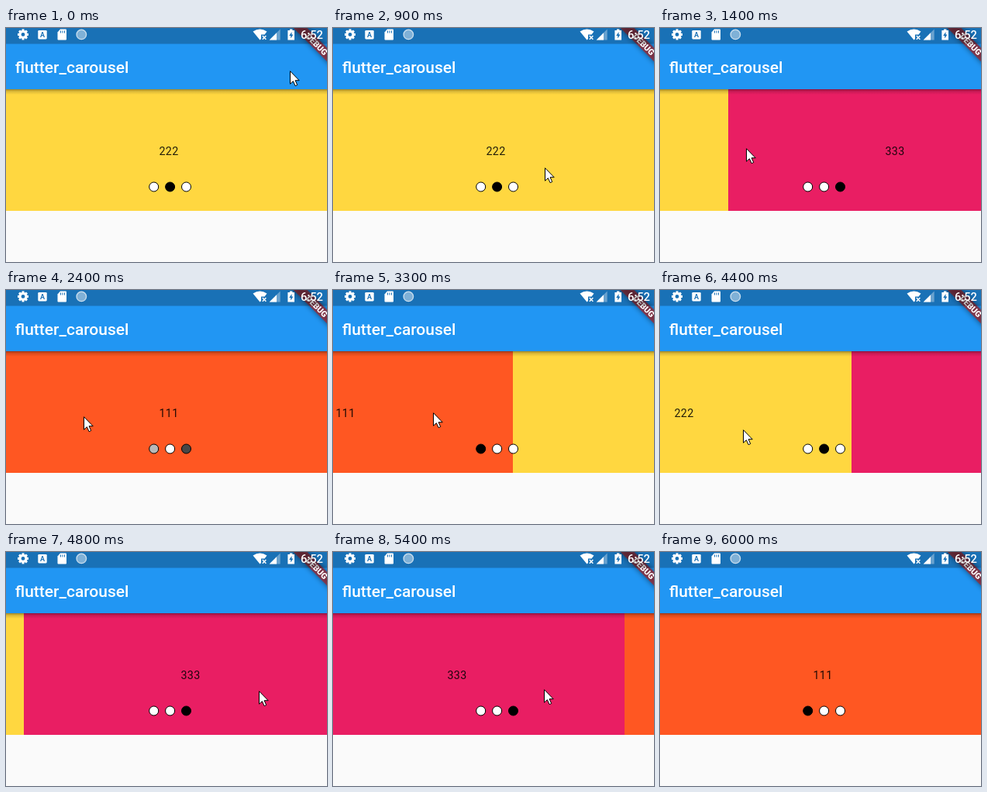
Recreate the animation shown at these times as an HTML page. Size 414 by 302 pixels, loop 6.5 s.

```html
<!DOCTYPE html>
<html lang="en">
<head>
<meta charset="utf-8">
<title>Carousel demo</title>
<style>
html, body { margin: 0; width: 100%; height: 100%; overflow: hidden; background: #fafafa; }
svg { display: block; width: 414px; height: 302px; font-family: Roboto, sans-serif; }
</style>
</head>
<body>
<svg viewBox="0 0 414 302" xmlns="http://www.w3.org/2000/svg">
  <defs>
    <linearGradient id="shade" x1="0" y1="0" x2="0" y2="1">
      <stop offset="0" stop-color="#000" stop-opacity=".38"/>
      <stop offset=".4" stop-color="#000" stop-opacity=".14"/>
      <stop offset="1" stop-color="#000" stop-opacity="0"/>
    </linearGradient>
    <filter id="soft" x="-20%" y="-150%" width="140%" height="400%">
      <feGaussianBlur stdDeviation="3.5"/>
    </filter>
    <clipPath id="view"><rect y="79" width="414" height="157"/></clipPath>
  </defs>
  <rect width="414" height="302" fill="#fafafa"/>

  <g id="pages" clip-path="url(#view)" font-size="14.3" letter-spacing=".25" text-anchor="middle" fill-opacity=".87"></g>
  <g id="dots" stroke="#000"></g>

  <rect y="79" width="414" height="7" fill="url(#shade)"/>
  <rect width="414" height="79" fill="#2196f3"/>
  <text x="11.7" y="57.6" font-size="21" font-weight="500" fill="#fff">flutter_carousel</text>

  <g transform="translate(400.8 21.2) rotate(45)">
    <rect x="-42" y="-6.3" width="84" height="12.6" fill-opacity=".5" filter="url(#soft)"/>
    <rect x="-42" y="-6.3" width="84" height="12.6" fill="#b71c1c" fill-opacity=".63"/>
    <text y="3.8" font-size="10.7" font-weight="900" text-anchor="middle" fill="#fff">DEBUG</text>
  </g>
  <rect width="414" height="20.5" fill-opacity=".25"/>

  <g fill="#fff">
    <g transform="translate(22 8.4)">
      <circle r="4" fill="none" stroke="#fff" stroke-width="3.2"/>
      <g id="teeth"></g>
    </g>
    <rect x="41.3" y="3" width="11.4" height="11.4" rx="1.3"/>
    <text x="47" y="12" font-size="9" font-weight="700" text-anchor="middle" fill="#1970b6">A</text>
    <path d="M70 1.6h7q1 0 1 1v12q0 1-1 1h-9.500q-1 0-1-1v-9z"/>
    <path d="M70.500 3.500v3M73 3.500v3M75.500 3.500v3" stroke="#1970b6"/>
    <circle cx="97.300" cy="8.400" r="6.300" fill-opacity=".45" stroke="#fff" stroke-opacity=".7" stroke-width="1.300"/>

    <path d="M318.500 4.500Q327.500-1.500 336.500 4.500L333.500 8.500H329V14L327.500 15.500Z"/>
    <path d="M330.800 10l4.600 4.800M335.400 10l-4.600 4.800" stroke="#fff" stroke-width="1.500"/>
    <path d="M353.700 1.500V15.500H339.700Z" fill-opacity=".35"/>
    <path d="M349 6.200V15.500H339.700Z"/>
    <path d="M366 1.500h3.400v1.600h2.600v12.400h-8.600V3.100H366z"/>
    <path d="M368.500 5l-3.300 5h2v3.500l3.200-5h-1.900z" fill="#1970b6"/>
    <text x="380" y="14" font-size="14.700" font-weight="500">6:52</text>
  </g>

  <path id="mouse" d="M.5 .7V17.200L4.400 13.700L7.100 19.700L9.700 18.500L7.100 12.700H12.200Z" fill="#fff" stroke="#000"/>
</svg>
<script>
const LOOP = 6500, STEP = 100, HIDE = 6000;
const W = 431, LEFT = -5, SLOP = 20, FADE = 100, BACK = 335;
const slides = [["111", "#ff5722"], ["222", "#ffd740"], ["333", "#e91e63"]];

// each swipe drags from a to b, then the pointer waits and goes back;
// a snapping swipe jumps to the next page on release, others fling
const swipes = [
  { from: 900, to: 1250, a: [273, 180], b: [111, 155], wait: 150, speed: 1500 },
  { from: 2060, to: 2372, a: [346, 163], b: [95, 163], snap: true },
  { from: 2950, to: 3300, a: [343, 168], b: [129, 158], speed: 1700 },
  { from: 4010, to: 4515, a: [306, 180], b: [77, 180], speed: 0 },
  { from: 5250, to: 5672, a: [342, 179], b: [101, 172], snap: true }
];

// pointer rests as [time, [x, y]]
const rests = [[0, [366, 55]], [700, swipes[0].a]];
swipes.forEach((s, i) => {
  const end = s.to + (s.wait || 0);
  const next = swipes[i + 1] ? swipes[i + 1].a : [375, 178];
  rests.push([s.from, s.a], [s.to, s.b], [end, s.b], [end + BACK, next]);
});

const $ = q => document.querySelector(q);
const ease = k => k * k * (3 - 2 * k);
const mix = (a, b, k) => a + (b - a) * k;
const repeat = (n, f) => Array.from({ length: n }, (_, i) => f(i)).join("");

$("#teeth").innerHTML = repeat(8, i =>
  `<rect x="-1.5" y="-7" width="3" height="3" transform="rotate(${i * 45})"/>`);
$("#dots").innerHTML = repeat(3, i => `<circle cx="${190.7 + i * 20.9}" cy="205" r="6"/>`);
$("#pages").innerHTML = repeat(2, () =>
  `<g><rect y="79" width="${W + 1}" height="158" fill-opacity="1"/><text x="215" y="163.5"></text></g>`);
const pages = [...$("#pages").children], dots = [...$("#dots").children];

function pointer(t) {
  const i = rests.findIndex(r => r[0] > t);
  if (i < 0) return rests[rests.length - 1][1];
  const [t0, p] = rests[i - 1], [t1, q] = rests[i];
  const k = ease((t - t0) / (t1 - t0));
  return [mix(p[0], q[0], k), mix(p[1], q[1], k)];
}

// overdamped page spring: distance left after s seconds
function spring(x, v, s) {
  const r = 9.07, q = 22.2, a = (q * x - v) / (q - r);
  return a * Math.exp(-r * s) + (x - a) * Math.exp(-q * s);
}

function scroll(t) {
  const n = swipes.filter(s => s.from <= t).length;
  if (!n) return W;
  const s = swipes[n - 1];
  const moved = Math.max(0, s.a[0] - SLOP - pointer(Math.min(t, s.to))[0]);
  if (t < s.to) return n * W + moved;
  return (n + 1) * W - (s.snap ? 0 : spring(W - moved, s.speed, (t - s.to) / 1000));
}

function draw(t) {
  const pos = Math.round(scroll(t)), first = Math.floor(pos / W);
  pages.forEach((g, i) => {
    const n = first + i, [label, color] = slides[n % 3];
    g.setAttribute("transform", `translate(${n * W - pos + LEFT} 0)`);
    g.firstChild.setAttribute("fill", color);
    g.lastChild.textContent = label;
  });

  const done = swipes.filter(s => s.to <= t).length;
  const k = done ? Math.min(1, (t - swipes[done - 1].to) / FADE) : 1;
  const ink = [0, 0, 0];
  ink[done % 3] = 1 - k;
  ink[(done + 1) % 3] = k;
  dots.forEach((c, i) => {
    const v = Math.round(255 * (1 - ink[i]));
    c.setAttribute("fill", `rgb(${v},${v},${v})`);
  });

  const [x, y] = pointer(t).map(Math.round);
  $("#mouse").setAttribute("transform", `translate(${x} ${y})`);
  $("#mouse").style.display = t < HIDE ? "" : "none";
}

const start = performance.now();
function tick() {
  const t = (performance.now() - start) % LOOP;
  draw(Math.floor(t / STEP) * STEP);
  requestAnimationFrame(tick);
}
tick();
</script>
</body>
</html>
```
